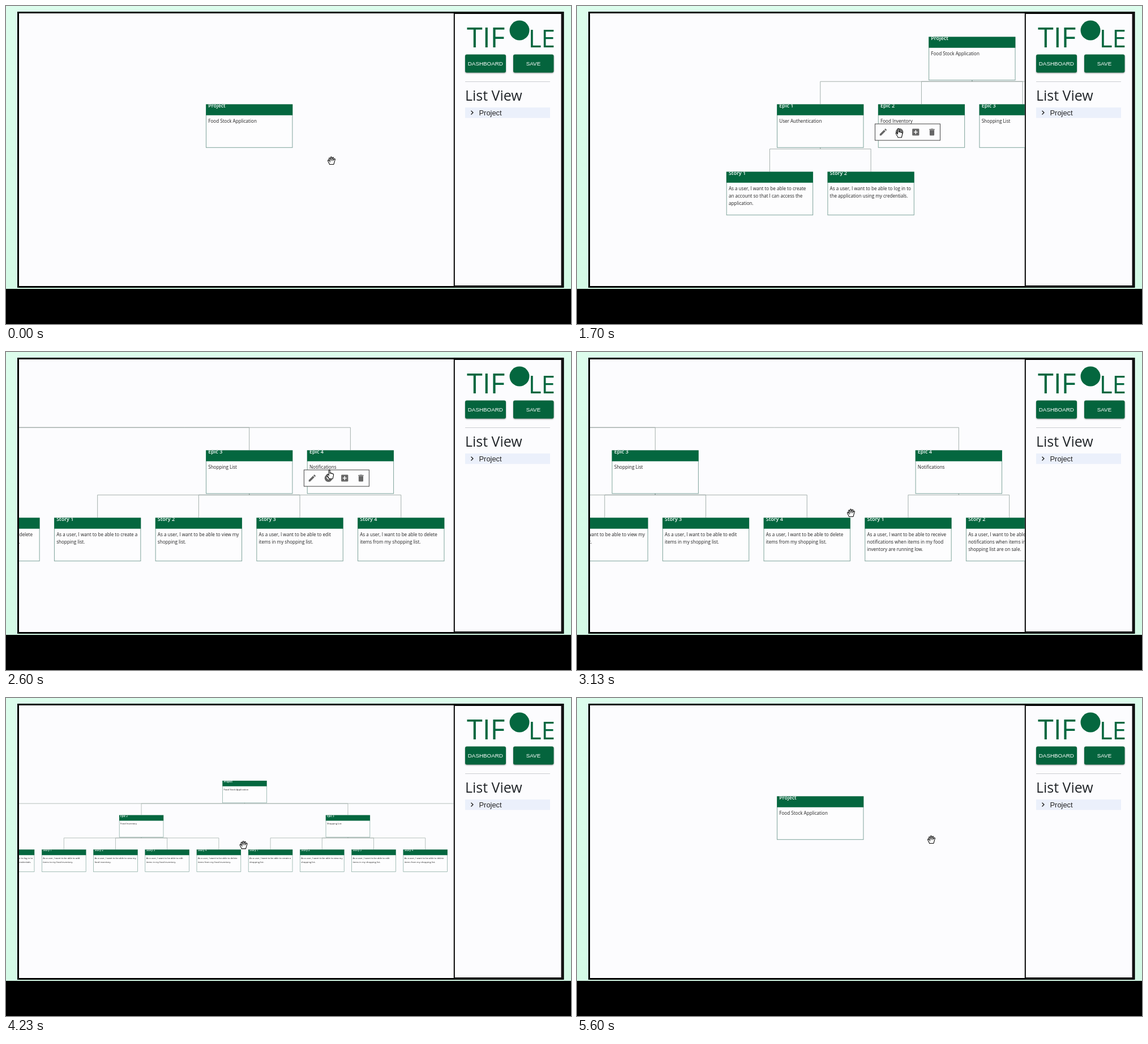
Animation, 998 px wide and 561 px high, one loop 5.63 s. Source, as an HTML page with a canvas:

```html
<!DOCTYPE html>
<html lang="en">
<head>
<meta charset="utf-8">
<title>Project tree</title>
<style>
html, body { margin: 0; width: 100%; height: 100%; overflow: hidden; background: #000; }
svg, canvas { position: absolute; left: 0; top: 0; display: block; }
.sans { font-family: "Open Sans", "Noto Sans", sans-serif; }
.arial { font-family: "Liberation Sans", Arial, sans-serif; }
.btn { filter: drop-shadow(0 1px 1px #0006); }
</style>
</head>
<body>
<svg width="998" height="561">
  <defs>
    <linearGradient id="mint" x2="0" y2="1">
      <stop stop-color="#dcfdec"/><stop offset="1" stop-color="#d4fae6"/>
    </linearGradient>
  </defs>
  <rect width="998" height="499" fill="url(#mint)"/>
  <rect x="21.5" y="11.5" width="962.5" height="484" fill="#fcfcfe" stroke="#000" stroke-width="3"/>
  <rect x="791.8" y="13" width="189.8" height="481" fill="#fcfcfe" stroke="#000" stroke-width="2"/>
  <g class="sans" font-size="50" fill="#04673f">
    <text x="814" y="73">TIF</text>
    <circle cx="907" cy="43" r="17.5"/>
    <text x="970" y="73" text-anchor="end" font-size="44">LE</text>
  </g>
  <g class="arial" font-size="9.8" fill="#fff" text-anchor="middle">
    <g class="btn" fill="#04643d">
      <rect x="811" y="85.5" width="72" height="32" rx="3"/>
      <rect x="896" y="85.5" width="71.5" height="32" rx="3"/>
    </g>
    <text x="846.8" y="104.7">DASHBOARD</text>
    <text x="931.5" y="104.7">SAVE</text>
  </g>
  <path d="M811 133.5H961" stroke="#ccced2"/>
  <text class="sans" x="811" y="167" font-size="25" fill="#212529">List View</text>
  <rect x="811" y="179" width="150" height="18.5" fill="#ebf0fb"/>
  <path d="M821.5 184.8l3.4 3.3-3.4 3.3" fill="none" stroke="#222" stroke-width="1.4"/>
  <text class="arial" x="835.5" y="192.5" font-size="12.9" fill="#222">Project</text>
</svg>
<canvas id="stage" width="998" height="561"></canvas>
<script>
const ctx = document.getElementById('stage').getContext('2d');
const LOOP = 5630, GAP = 178.7, ROW = 119, W = 153, H = 76.5, MOVE = 130;
const GREEN = '#04673f', FONT = '"Open Sans", "Noto Sans", sans-serif';

const want = 'As a user, I want to be able to ';
const actions = (add, view, edit, del) => [add, view, edit, del];
const epics = [
  ['User Authentication', [
    'create|an account so that I can access the|application.',
    'log in to|the application using my credentials.']],
  ['Food Inventory', [
    'add|items to my food inventory.', 'view my|food inventory.',
    'edit|items in my food inventory.', 'delete|items from my food inventory.']],
  ['Shopping List', [
    'create a|shopping list.', 'view my|shopping list.',
    'edit|items in my shopping list.', 'delete|items from my shopping list.']],
  ['Notifications', [
    'receive|notifications when items in my food|inventory are running low.',
    'receive|notifications when items in my|shopping list are on sale.']]
];

// time, epic columns, open nodes (r = root, digits = epics)
const layouts = [
  [0, [0, 0, 0, 0], ''],
  [620, [0, 1, 2, 3], 'r'],
  [1310, [0, 1, 2, 3], 'r0'],
  [1730, [0, 3, 4, 5], 'r01'],
  [2330, [0, 3, 7, 8], 'r012'],
  [2720, [0, 3, 7, 10], 'r0123'],
  [4590, [0, 1.5, 3, 6], 'r023'],
  [5010, [0, 0, 0, 0], '']
];

// time, root centre x, root top y, zoom
const camera = [
  [0, 429.7, 173.5, 1],
  [1310, 429.7, 173.5, 1], [1440, 697.8, 54.5, 1],
  [1730, 697.8, 54.5, 1], [1860, 340.4, 54.5, 1],
  [2330, 340.4, 54.5, 1], [2460, -106.4, 54.5, 1],
  [2720, -106.4, 54.5, 1], [2850, -463.8, 54.5, 1],
  [2920, -463.8, 54.5, 1], [3100, -219.2, 54.5, 1],
  [3200, -219.2, 54.5, 1], [3450, 125, 167, .5104],
  [3760, 125, 167, .5104], [3830, 127.5, 153, .5104],
  [4120, 421.5, 146, .5104], [4270, 421.5, 146, .5104],
  [4400, 636, 141, .5104], [4470, 648.6, 139, .5277],
  [4590, 648.6, 139, .5277], [4720, 601.4, 139, .5277],
  [5010, 601.4, 139, .5277], [5230, 429.7, 173.5, 1]
];

// time, x, y, shape from then on
const pointer = [
  [0, 575, 273, 'open'], [40, 575, 273, 'open'], [200, 475, 215, 'point'],
  [280, 440, 200, 'point'], [480, 390, 224, 'point'], [760, 390, 224, 'point'],
  [860, 345, 250, 'open'], [1080, 202, 305, 'point'], [1130, 190, 316, 'point'],
  [1270, 123, 342, 'point'], [1380, 123, 342, 'open'], [1600, 590, 190, 'point'],
  [1700, 569, 224, 'point'], [1950, 569, 224, 'point'], [2170, 592, 189, 'point'],
  [2290, 569, 224, 'point'], [2480, 580, 200, 'point'], [2680, 569, 224, 'point'],
  [2770, 569, 224, 'open'], [2890, 240, 284, 'open'], [2920, 240, 284, 'shut'],
  [3100, 484, 284, 'open'], [3450, 484, 284, 'open'], [3740, 443.5, 271, 'open'],
  [3760, 443.5, 271, 'shut'], [3830, 446, 257, 'shut'], [4120, 740, 250, 'open'],
  [4250, 400, 260, 'open'], [4270, 400, 260, 'shut'], [4400, 615, 255, 'open'],
  [4460, 615, 255, 'open'], [4540, 450, 214, 'point'], [4580, 433, 235, 'point'],
  [4640, 433, 235, 'point'], [4730, 440, 217, 'point'], [4860, 590, 148, 'point'],
  [4950, 573, 172, 'point'], [5050, 573, 172, 'point'], [5250, 400, 225, 'point'],
  [5370, 400, 225, 'point'], [5450, 510, 236, 'open'], [5590, 626, 250, 'open']
];

// from, to, epic (-1 = root)
const toolbars = [
  [300, 800, -1], [1160, 1330, 0], [1560, 1750, 1], [2050, 2350, 2],
  [2540, 2740, 3], [4550, 4790, 1], [4860, 5440, -1]
];

const hands = {
  open: 'M-3.5 6.5C-4 4-6.5 1.5-6.5-.5C-6.5-1.8-4.8-1.6-4 0L-3.2 1L-4.6-3.6C-4.9-5.2-3-5.6-2.5-4L-1.7-1.5L-1.6-5.6C-1.6-7.3.4-7.3.5-5.6L.7-1.8L1.8-5.2C2.4-6.7 4.1-6 3.7-4.6L3-1L4.6-2.9C5.6-4.1 6.9-3 6.3-1.7C5 1 5.2 3.5 3.7 6.5Z',
  shut: 'M-3 6C-3.4 4-5.3 2.5-5.3.5C-5.3-.8-4.4-1-3.5-.5V-3.5C-3.5-5-1.6-5.2-1.2-4C-.8-5.6 1-5.5 1.3-4C2-5 3.4-4.6 3.5-3.2C4.5-3.8 5.5-3 5.4-1.8C5.2 1 4.8 3.5 3.6 6Z',
  point: 'M-2 8C-2.5 5.5-5.5 3-5.8.8C-5.8-.4-4.3-.4-3.4.9L-2.6 1.8V-6.5C-2.6-8.3-.5-8.3-.5-6.5V-1.8C.3-2.7 1.6-2.4 1.7-1.4C2.6-2.2 3.8-1.8 3.9-.7C4.8-1.3 5.8-.7 5.8.4C5.8 3.5 4.8 5 4.3 8Z'
};
for (const name in hands) hands[name] = new Path2D(hands[name]);

// fill, then an optional white stroke, on a 24 unit grid
const icons = [
  ['M3 17.25V21h3.75L17.81 9.94l-3.75-3.75zM20.71 7.04a1 1 0 0 0 0-1.41l-2.34-2.34a1 1 0 0 0-1.41 0l-1.83 1.83 3.75 3.75z', ''],
  ['M12 2a10 10 0 1 0 0 20a10 10 0 1 0 0-20z', 'M7.5 10l4.5 4.5 4.5-4.5'],
  ['M5 3h14a2 2 0 0 1 2 2v14a2 2 0 0 1-2 2H5a2 2 0 0 1-2-2V5a2 2 0 0 1 2-2z', 'M7 12h10M12 7v10'],
  ['M6 19c0 1.1.9 2 2 2h8c1.1 0 2-.9 2-2V7H6zM19 4h-3.5l-1-1h-5l-1 1H5v2h14z', '']
].map(pair => pair.map(d => new Path2D(d)));

const lerp = (a, b, p) => a + (b - a) * p;
const ease = p => p * p * (3 - 2 * p);
const clamp = p => Math.min(1, Math.max(0, p));

function sample(keys, t) {
  const i = keys.findLastIndex(k => k[0] <= t);
  const a = keys[i], b = keys[i + 1] || a;
  const p = b === a ? 0 : ease((t - a[0]) / (b[0] - a[0]));
  return a.slice(1).map((v, n) => typeof v === 'number' ? lerp(v, b[n + 1], p) : v);
}

function treeAt(t) {
  const i = layouts.findLastIndex(l => l[0] <= t);
  const now = layouts[i], old = layouts[Math.max(0, i - 1)];
  const p = ease(clamp((t - now[0]) / MOVE));
  const open = id => lerp(+old[2].includes(id), +now[2].includes(id), p);
  const cols = now[1].map((c, n) => lerp(old[1][n], c, p));
  const mid = (cols[0] + cols[3]) / 2, shown = open('r');
  const root = { x: 0, y: 0, a: 1, title: 'Project', lines: ['Food Stock Application'] };
  const nodes = [root], tops = [];
  epics.forEach(([name, stories], n) => {
    const epic = { x: (cols[n] - mid) * GAP, y: ROW * shown, a: shown,
      title: 'Epic ' + (n + 1), lines: [name], parent: root };
    const o = open(String(n));
    tops.push(epic);
    nodes.push(epic);
    stories.forEach((text, j) => nodes.push({
      x: epic.x + o * (j - (stories.length - 1) / 2) * GAP, y: epic.y + ROW * o, a: o * shown,
      title: 'Story ' + (j + 1), lines: (want + text).split('|'), parent: epic
    }));
  });
  return { root, tops, nodes };
}

function drawLink({ x, y, a, parent }, k) {
  ctx.globalAlpha = a;
  ctx.strokeStyle = '#9aa8a3';
  ctx.lineWidth = Math.max(.7, .9 * k) / k;
  ctx.beginPath();
  ctx.moveTo(parent.x, parent.y + H);
  ctx.lineTo(parent.x, parent.y + 78.7);
  ctx.lineTo(x, parent.y + 78.7);
  ctx.lineTo(x, y);
  ctx.stroke();
}

function drawCard({ x, y, a, title, lines }, k) {
  ctx.save();
  ctx.globalAlpha = a;
  ctx.translate(x - W / 2, y);
  ctx.fillStyle = '#fdfdfe';
  ctx.fillRect(0, 0, W, H);
  ctx.strokeStyle = '#7fa49b';
  ctx.lineWidth = Math.max(.7, k) / k;
  ctx.strokeRect(.3, .3, W - .6, H - .6);
  ctx.beginPath();
  ctx.rect(0, 0, W, 19.2);
  ctx.fillStyle = GREEN;
  ctx.fill();
  ctx.fillStyle = '#222';
  ctx.font = '8.1px ' + FONT;
  lines.forEach((line, n) => ctx.fillText(line, 4, 32.8 + n * 12.7));
  ctx.clip();
  ctx.fillStyle = '#fff';
  ctx.font = '600 9px ' + FONT;
  ctx.fillText(title, 4, 5.8);
  ctx.restore();
}

function drawToolbar(x, y) {
  ctx.fillStyle = '#fdfdfe';
  ctx.fillRect(x - 57.5, y - 14.5, 115, 29);
  ctx.strokeStyle = '#444';
  ctx.lineWidth = 1;
  ctx.strokeRect(x - 57.5, y - 14.5, 115, 29);
  icons.forEach(([shape, mark], n) => {
    ctx.save();
    ctx.translate(x + (n - 1.5) * 28.7, y);
    ctx.scale(.68, .68);
    ctx.translate(-12, -12);
    ctx.fillStyle = '#666';
    ctx.fill(shape);
    ctx.strokeStyle = '#fff';
    ctx.lineWidth = 2.2;
    ctx.stroke(mark);
    ctx.restore();
  });
}

function drawHand(x, y, kind) {
  ctx.save();
  ctx.translate(x, y);
  ctx.fillStyle = '#fff';
  ctx.strokeStyle = '#111';
  ctx.lineWidth = 1.1;
  ctx.fill(hands[kind]);
  ctx.stroke(hands[kind]);
  ctx.restore();
}

function draw() {
  const t = performance.now() % LOOP;
  const [x, y, k] = sample(camera, t);
  const { root, tops, nodes } = treeAt(t);
  const visible = nodes.filter(n => n.a > 0);
  ctx.clearRect(0, 0, 998, 561);
  ctx.save();
  ctx.beginPath();
  ctx.rect(23, 13, 767.8, 481);
  ctx.clip();
  ctx.save();
  ctx.translate(x, y);
  ctx.scale(k, k);
  visible.filter(n => n.parent).forEach(n => drawLink(n, k));
  visible.reverse().forEach(n => drawCard(n, k));
  ctx.restore();
  const bar = toolbars.find(([from, to]) => t >= from && t < to);
  if (bar) {
    const node = tops[bar[2]] || root;
    drawToolbar(x + (node.x - 24.5) * k, y + node.y * k + 16.2 + 32.8 * k);
  }
  drawHand(...sample(pointer, t));
  ctx.restore();
  requestAnimationFrame(draw);
}
draw();
</script>
</body>
</html>
```
